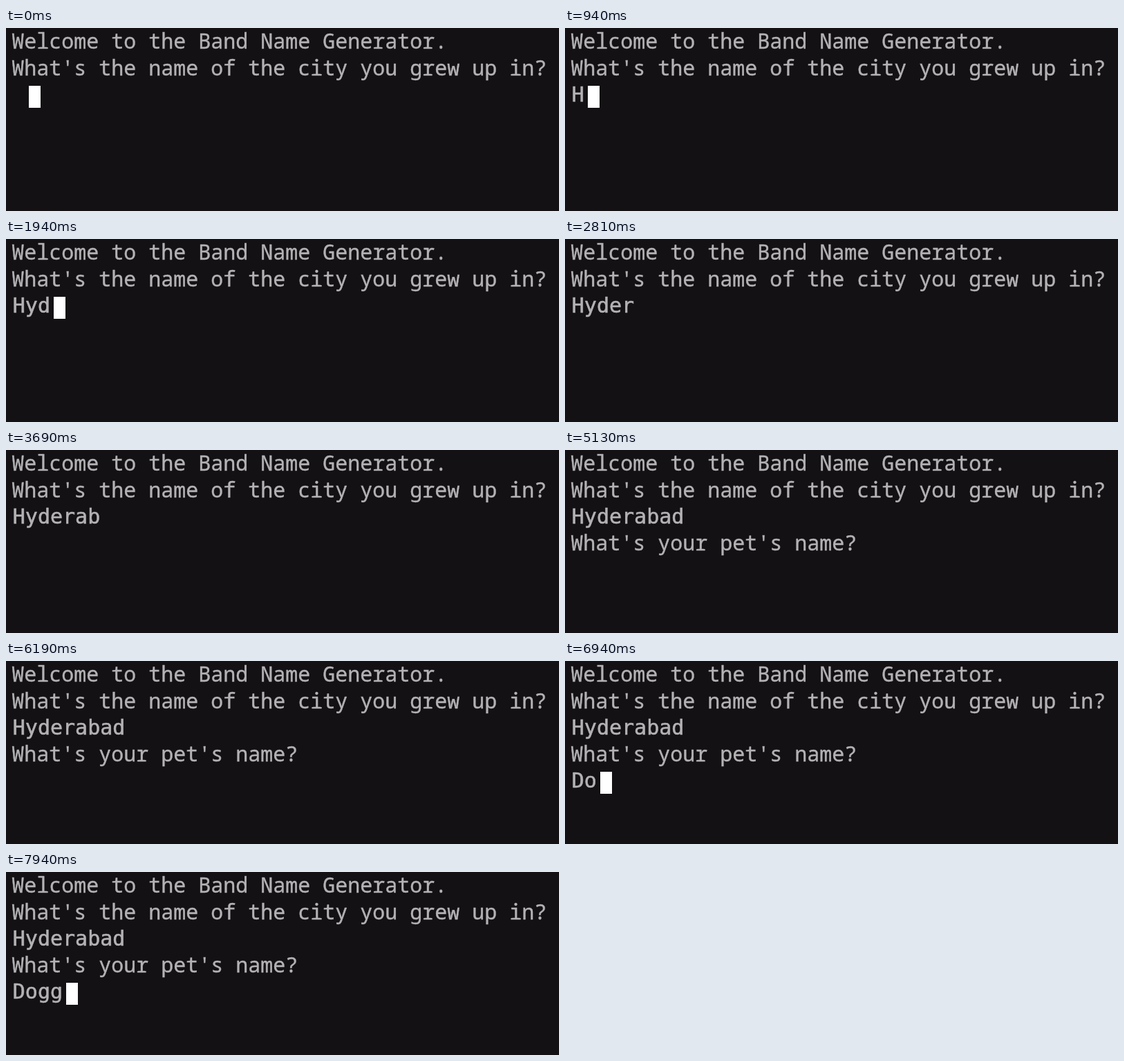
Write an HTML page with a canvas that moves like this. It is 800 by 266 pixels and loops after 8 s.

```html
<!DOCTYPE html>
<html lang="en">
<head>
<meta charset="utf-8">
<title>Band Name Generator</title>
<style>
html, body { margin: 0; width: 100%; height: 100%; overflow: hidden; background: #131114; }
canvas { display: block; width: 800px; height: 266px; }
</style>
</head>
<body>
<canvas id="stage" width="800" height="266"></canvas>
<script>
const ctx = document.getElementById('stage').getContext('2d');
const LOOP = 8000, PITCH = 18, ASK_PET = 5130;
const PROMPT = { font: '30px "Noto Sans Mono", "DejaVu Sans Mono", monospace', x: 8.2, weight: 0.4 };
const INPUT = { font: '30px "DejaVu Sans Mono", "Noto Sans Mono", monospace', x: 9.8, weight: 0.6 };

// Each answer: row, key press times and cursor toggle times (starting hidden).
const answers = [
  { text: 'Hyderabad', row: 2, from: 0, to: ASK_PET,
    keys: [690, 1380, 1750, 2380, 2690, 3250, 3690, 4130, 4560],
    blinks: [0, 440, 940, 1440, 1940, 2440, 2940, 3440, 3940, 4440, 4940] },
  { text: 'Dogg', row: 4, from: ASK_PET, to: LOOP,
    keys: [6380, 6940, 7440, 7940],
    blinks: [5630, 6190, 6630, 7190, 7630] }
];

const baseline = row => 30.4 + row * 38.4;
const passed = (times, t) => times.filter(x => x <= t).length;

// A thin outline gives the letters their slightly heavier weight.
function write(text, row, style) {
  ctx.font = style.font;
  ctx.fillStyle = ctx.strokeStyle = '#b4b2b4';
  ctx.lineWidth = style.weight;
  ctx.fillText(text, style.x, baseline(row));
  ctx.strokeText(text, style.x, baseline(row));
}

function drawAnswer(a, t) {
  if (t < a.from) return;
  const typed = passed(a.keys, t);
  write(a.text.slice(0, typed), a.row, INPUT);
  if (t < a.to && passed(a.blinks, t) % 2) {
    ctx.fillStyle = '#fff';
    ctx.fillRect(15 + PITCH * Math.max(typed, 1), Math.round(baseline(a.row)) - 23, 17, 32);
  }
}

function draw(t) {
  ctx.fillStyle = '#131114';
  ctx.fillRect(0, 0, 800, 266);
  write('Welcome to the Band Name Generator.', 0, PROMPT);
  write("What's the name of the city you grew up in?", 1, PROMPT);
  if (t >= ASK_PET) write("What's your pet's name?", 3, PROMPT);
  answers.forEach(a => drawAnswer(a, t));
}

const start = performance.now();
function tick() {
  draw((performance.now() - start) % LOOP);
  requestAnimationFrame(tick);
}
tick();
</script>
</body>
</html>
```
